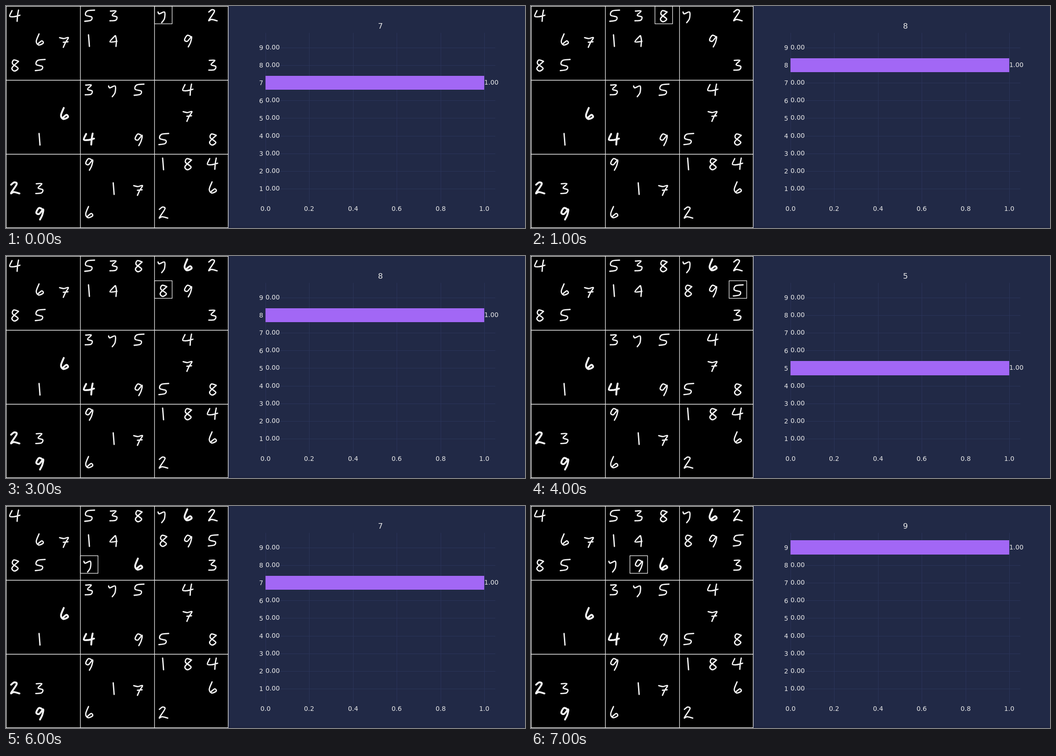
Write an HTML page that moves like this. It is 1120 by 480 pixels and loops after 8 s.

```html
<!DOCTYPE html>
<html lang="en">
<head>
<meta charset="utf-8">
<title>Sudoku solver</title>
<style>
  html, body { margin: 0; width: 100%; height: 100%; overflow: hidden; background: #212946; }
  svg { display: block; }
  text { font: 13.89px "DejaVu Sans", sans-serif; fill: #e6e6e6; }
  #title { font-size: 16.67px; }
  .mid { text-anchor: middle; }
  .end { text-anchor: end; }
  #ink { fill: none; stroke: #f4f4f4; stroke-width: 2.8; stroke-linecap: round; stroke-linejoin: round; }
  #ink .bold { stroke-width: 4; }
  .rule, #box { fill: none; stroke: #eee; stroke-width: 1.3; }
  #grid { stroke: #2a3459; stroke-width: 1.1; }
</style>
</head>
<body>
<svg width="1120" height="480" viewBox="0 0 1120 480">
  <rect width="480" height="480"/>
  <path class="rule" d="M.5 .5H479.5V479.5H.5ZM160.5 0V480M320.5 0V480M0 160.5H480M0 320.5H480"/>
  <g id="ink"></g>
  <rect id="box" width="38" height="38"/>
  <rect x="480" y="476" width="640" height="4" fill="#1f2642"/>
  <path id="grid"/>
  <rect id="bar" x="560" width="472" fill="#a267f5"/>
  <g id="labels"></g>
  <text id="title" class="mid" x="808" y="49"></text>
</svg>
<script>
const $ = id => document.getElementById(id);
const CELL = 160 / 3, STEP_MS = 1000;

// Key points of each handwritten form, from the cell corner; "|" lifts the pen.
// A is a closed 4, J a hooked 7.
const forms = {
  1: '18 9 19 21 20 34',
  2: '11 13 18 8 23 12 11 31 17 29 29 32',
  3: '12 11 24 11 16 20 26 24 23 31 11 32',
  4: '13 10 8 22 18 23 30 20|27 9 25 20 24 33',
  A: '22 11 11 24 26 23|23 11 25 21 24 34',
  5: '31 9 15 11 12 20 25 24 23 31 10 33',
  6: '18 7 12 23 17 31 27 27 24 22 16 28',
  7: '9 15 18 17 28 15 22 25 17 36|17 25 27 24',
  J: '8 13 11 17 22 13 22 27 16 36',
  8: '27 13 17 10 14 18 26 28 18 34 13 27 27 13',
  9: '27 14 18 10 12 20 18 23 27 13 25 25 20 35'
};

const puzzle = [
  '4..53...2', '.671A..9.', '85......3',
  '...3J5.4.', '..6....7.', '.1.4.95.8',
  '...9..184', '23..17..6', '.9.6..2..'
];
const bold = ['07', '25', '42', '53', '70', '81'];

// row, column, digit, form when it differs from the digit
const moves = [
  [0, 6, 7, 'J'], [0, 5, 8], [0, 7, 6], [1, 6, 8],
  [1, 8, 5], [2, 5, 6], [2, 3, 7, 'J'], [2, 4, 9]
];

// Smooth curve through every point of a stroke.
function strokePath(stroke) {
  const n = stroke.split(' ').map(Number), last = n.length / 2 - 1;
  const at = i => {
    const k = 2 * Math.max(0, Math.min(last, i));
    return [n[k], n[k + 1]];
  };
  let d = 'M' + at(0);
  for (let i = 0; i < last; i++) {
    const [a, b, c, e] = [at(i - 1), at(i), at(i + 1), at(i + 2)];
    const c1 = b.map((v, k) => v + (c[k] - a[k]) / 6);
    const c2 = c.map((v, k) => v - (e[k] - b[k]) / 6);
    d += `C${c1} ${c2} ${c}`;
  }
  return d;
}

function write(row, col, form) {
  const path = document.createElementNS('http://www.w3.org/2000/svg', 'path');
  path.setAttribute('d', forms[form].split('|').map(strokePath).join(''));
  path.setAttribute('transform', `translate(${col * CELL} ${row * CELL})`);
  if (bold.includes(`${row}${col}`)) path.setAttribute('class', 'bold');
  return $('ink').appendChild(path);
}

puzzle.forEach((line, row) => [...line].forEach((form, col) => {
  if (form !== '.') write(row, col, form);
}));
const moveInk = moves.map(([row, col, digit, form = digit]) => write(row, col, form));

const digits = [1, 2, 3, 4, 5, 6, 7, 8, 9];
const ticks = [0, 0.2, 0.4, 0.6, 0.8, 1];
const xOf = v => 560 + v * 496 / 1.05;
const yOf = v => 427.2 - (v - 0.16) * 369.6 / 9.68;
const snap = v => Math.round(v) + 0.5;

$('grid').setAttribute('d',
  ticks.map(v => `M${snap(xOf(v))} 58V427`).join('') +
  digits.map(v => `M560 ${snap(yOf(v))}H1056`).join(''));

$('labels').innerHTML =
  ticks.map(v => `<text class="mid" x="${Math.round(xOf(v))}" y="443">${v.toFixed(1)}</text>`).join('') +
  digits.map(v => `<text class="end" x="555" y="${Math.round(yOf(v) + 5.3)}">${v}</text>` +
    `<text class="value" y="${Math.round(yOf(v) + 4)}"></text>`).join('');

const values = document.querySelectorAll('.value');
let shown = -1;

function show(step) {
  const [row, col, digit] = moves[step];
  moveInk.forEach((el, i) => el.style.display = i <= step ? '' : 'none');
  $('box').setAttribute('x', snap(col * CELL));
  $('box').setAttribute('y', snap(row * CELL));
  const top = Math.round(yOf(digit + 0.4));
  $('bar').setAttribute('y', top);
  $('bar').setAttribute('height', Math.round(yOf(digit - 0.4)) - top);
  values.forEach((el, i) => {
    const p = i + 1 === digit ? 1 : 0;
    el.setAttribute('x', Math.round(xOf(p)));
    el.textContent = p.toFixed(2);
  });
  $('title').textContent = digit;
}

function tick() {
  const step = Math.floor(performance.now() / STEP_MS) % moves.length;
  if (step !== shown) show(shown = step);
  requestAnimationFrame(tick);
}
tick();
</script>
</body>
</html>
```
